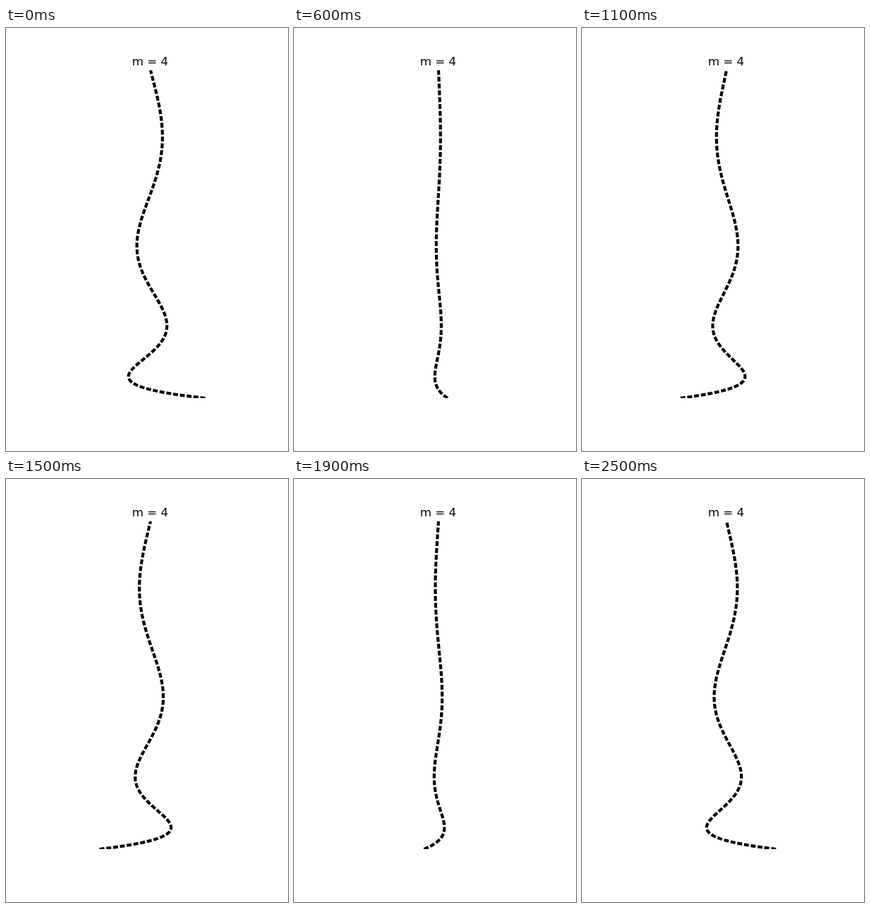
Animation, 400 px wide and 600 px high, one loop 2600 ms. Source, as an HTML page:

```html
<!DOCTYPE html>
<html lang="en">
<head>
<meta charset="utf-8">
<title>Hanging chain mode</title>
<style>
  html, body { margin: 0; width: 100%; height: 100%; overflow: hidden; background: #fff; }
  svg { display: block; width: 400px; height: 600px; }
  text { font: 16.667px "DejaVu Sans", sans-serif; text-anchor: middle; }
  path { fill: none; stroke: #000; stroke-width: 4.167; stroke-linejoin: round; stroke-dasharray: 6.944 2.778; }
</style>
</head>
<body>
<svg viewBox="0 0 400 600">
  <clipPath id="axes"><rect x="50" y="60" width="310" height="465"/></clipPath>
  <text x="204.5" y="53">m = 4</text>
  <g clip-path="url(#axes)"><path id="chain"/></g>
</svg>
<script>
const STEP = 100, STEPS = 26, DT = 0.01;
const ROOT = 14.930918;               // fifth zero of J0
const OMEGA = ROOT / 2 * Math.sqrt(9.81);
const CX = 205, AMP = 77.5, BOTTOM = 525, HEIGHT = 465, POINTS = 400;

// Bessel function J0 from its integral form
function j0(x) {
  const n = 40;
  let sum = 0;
  for (let i = 0; i < n; i++) sum += Math.cos(x * Math.sin((i + 0.5) * Math.PI / n));
  return sum / n;
}

const shape = Array.from({ length: POINTS + 1 }, (_, i) => {
  const z = i / POINTS;
  return { u: j0(ROOT * Math.sqrt(z)), y: BOTTOM - HEIGHT * z };
});

const chain = document.getElementById("chain");
let shown = -1;

function draw(step) {
  const a = AMP * Math.cos(OMEGA * DT * step);
  chain.setAttribute("d", "M" + shape.map(p => (CX + a * p.u).toFixed(3) + " " + p.y.toFixed(3)).join("L"));
}

function tick() {
  const step = Math.floor(performance.now() / STEP) % STEPS;
  if (step !== shown) draw(shown = step);
  requestAnimationFrame(tick);
}
tick();
</script>
</body>
</html>
```
